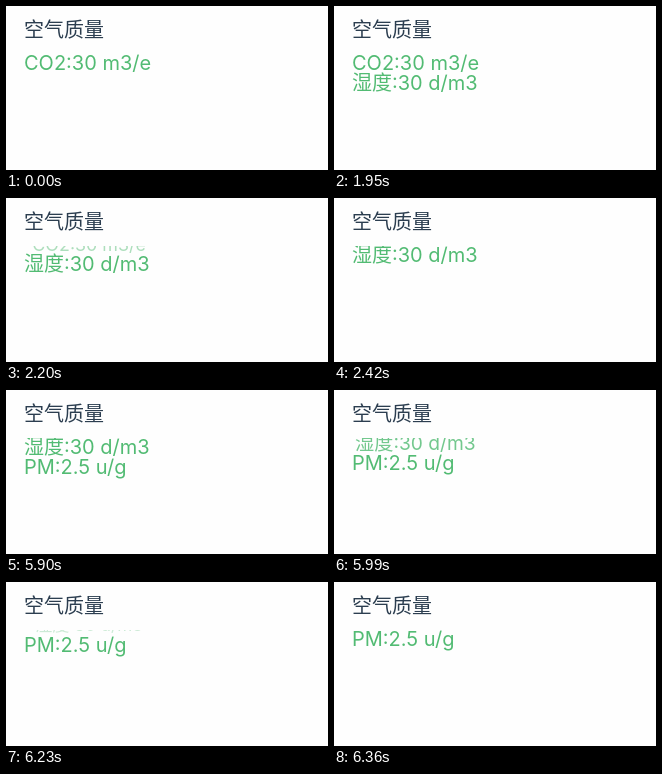
An HTML page that plays this animation: 322 by 164 pixels, repeating every 7140 ms.

```html
<!DOCTYPE html>
<html lang="zh-CN">
<head>
<meta charset="utf-8">
<style>
  html, body { margin: 0; width: 100%; height: 100%; overflow: hidden; background: #fefefe; }
  svg { display: block; }
  text { font: 20px Inter, "Noto Sans CJK SC", "Noto Sans CJK", sans-serif; }
  .title { fill: #2c3e50; }
  .line { fill: #52bb73; }
</style>
</head>
<body>
<svg width="322" height="164" viewBox="0 0 322 164">
  <clipPath id="window"><rect x="0" y="48" width="322" height="116"/></clipPath>
  <text class="title" x="18" y="31">空气质量</text>
  <g clip-path="url(#window)">
    <text class="line" x="18" y="64">CO2:30 m3/e</text>
    <text class="line" x="18" y="64">湿度:30 d/m3</text>
    <text class="line" x="18" y="64">PM:2.5 u/g</text>
  </g>
</svg>
<script>
  const LOOP = 7140;
  const ROW = 20;
  const ORIGIN = { x: 96, y: 58 };
  const changes = [{ start: 1950, end: 2420 }, { start: 5900, end: 6360 }];
  const lines = [...document.querySelectorAll('.line')];

  // Linear progress of a change; negative before it begins.
  const progress = (change, t) =>
    change ? Math.min((t - change.start) / (change.end - change.start), 1) : -1;

  function draw(now) {
    const t = now % LOOP;
    lines.forEach((line, i) => {
      const entering = i ? progress(changes[i - 1], t) : 1;
      const leaving = Math.max(progress(changes[i], t), 0);
      const visible = entering >= 0 && leaving < 1;
      const offset = ROW * (1 - entering - leaving);
      const scale = 1 - 0.2 * leaving;
      line.setAttribute('visibility', visible ? 'visible' : 'hidden');
      line.setAttribute('opacity', 1 - leaving);
      line.setAttribute('transform',
        `translate(${ORIGIN.x} ${ORIGIN.y + offset}) scale(${scale}) translate(${-ORIGIN.x} ${-ORIGIN.y})`);
    });
  }

  let origin;
  function tick(now) {
    origin ??= now;
    draw(now - origin);
    requestAnimationFrame(tick);
  }
  draw(0);
  requestAnimationFrame(tick);
</script>
</body>
</html>
```
